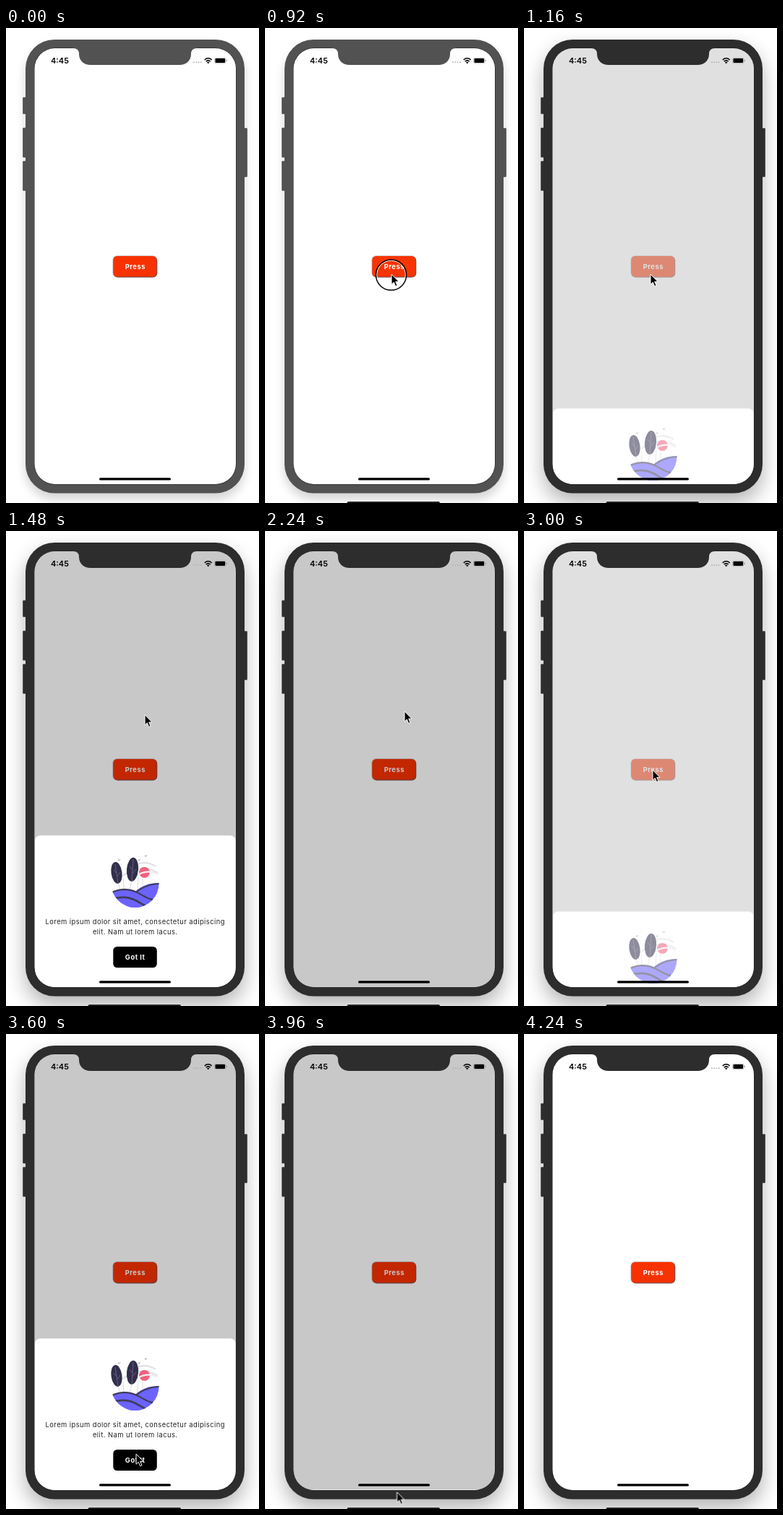
Write an HTML page that moves like this. It is 350 px wide and 656 px high and loops after 4.36 s.

```html
<!DOCTYPE html>
<html lang="en">
<head>
<meta charset="utf-8">
<title>Bottom sheet demo</title>
<style>
  html, body { margin: 0; width: 100%; height: 100%; overflow: hidden; background: #fff; }
  svg { display: block; width: 350px; height: 656px; }
  text { font-family: Inter, "Liberation Sans", sans-serif; }
  .label { font-size: 9.4px; font-weight: 700; letter-spacing: .5px; fill: #fff; text-anchor: middle; }
  .copy { font-size: 9.4px; letter-spacing: .44px; fill: #222; text-anchor: middle; }

  .phone, .soft, .deep, .dock, .backdrop, .sheet, .content, .press, .done, .cursor, .ring {
    animation: 4360ms linear infinite;
  }
  .phone { animation-name: focus; animation-timing-function: step-end; }
  .soft { animation-name: soft; animation-timing-function: step-end; }
  .deep { animation-name: deep; animation-timing-function: step-end; }
  .dock { animation-name: dock; animation-timing-function: step-end; }
  .ring { animation-name: ring; animation-timing-function: step-end; }
  .backdrop { animation-name: backdrop; }
  .content { animation-name: content; }
  .sheet { animation-name: slide; animation-timing-function: ease-in-out; }
  .press { animation-name: press; }
  .done { animation-name: done; }
  .cursor { animation-name: point; animation-timing-function: ease-in-out; }

  @keyframes focus { 0% { color: #525252 } 22%, 100% { color: #2d2d2d } }
  @keyframes soft { 0% { opacity: .17 } 22%, 100% { opacity: 0 } }
  @keyframes deep { 0% { opacity: 0 } 22%, 100% { opacity: .3 } }
  @keyframes dock { 0% { opacity: 0 } 5.5%, 100% { opacity: 1 } }
  @keyframes ring {
    0%, 23.85%, 44.95%, 66.05%, 86.24%, 100% { opacity: 0 }
    21.1%, 42.2%, 63.3%, 83.48% { opacity: 1 }
  }
  @keyframes backdrop {
    0%, 22.94%, 56.88%, 65.14%, 97.2%, 100% { opacity: 0 }
    29.59%, 51.4%, 71.79%, 91.28% { opacity: .216 }
  }
  @keyframes content {
    0%, 22.94%, 50.92%, 65.14%, 91.28%, 100% { opacity: 0 }
    29.59%, 44.95%, 71.79%, 85.78% { opacity: 1 }
  }
  @keyframes slide {
    0%, 23.17%, 50.92%, 65.37%, 91.28%, 100% { transform: translateY(212px) }
    30.05%, 44.95%, 72.25%, 85.78% { transform: none }
  }
  @keyframes press {
    0%, 21.1%, 30.73%, 63.3%, 72.94%, 100% { opacity: 1 }
    22.94%, 24.31%, 65.14%, 66.51% { opacity: .2 }
  }
  @keyframes done {
    0%, 83.49%, 92%, 100% { opacity: 1 }
    85.3%, 86.7% { opacity: .2 }
  }
  @keyframes point {
    0%, 5.4% { transform: translate(182px, 662px) }
    15.6%, 26.6% { transform: translate(175px, 340px) }
    33.03% { transform: translate(192px, 254px) }
    39%, 52.29% { transform: translate(193px, 249px) }
    59.63%, 74.3% { transform: translate(178px, 330px) }
    81.65%, 87.16% { transform: translate(180px, 580px) }
    93.58%, 100% { transform: translate(184px, 664px) }
  }
</style>
</head>
<body>
<svg viewBox="0 0 350 656" width="350" height="656">
  <defs>
    <clipPath id="screen"><rect x="39.5" y="28" width="278.5" height="602" rx="28"/></clipPath>
    <clipPath id="disc"><circle cx="178.5" cy="487" r="33"/></clipPath>
    <filter id="near" x="-20%" y="-20%" width="140%" height="140%"><feGaussianBlur stdDeviation="7"/></filter>
    <filter id="far" x="-20%" y="-20%" width="140%" height="140%"><feGaussianBlur stdDeviation="14"/></filter>
  </defs>

  <rect class="soft" x="27" y="25" width="303" height="626" rx="40" filter="url(#near)"/>
  <rect class="deep" x="27" y="29" width="303" height="626" rx="40" filter="url(#far)"/>

  <g class="phone" fill="currentColor">
    <g stroke="#444" stroke-width=".6">
      <rect x="23.3" y="96" width="6" height="22.5" rx="1"/>
      <rect x="23.3" y="138" width="6" height="40.5" rx="1"/>
      <rect x="23.3" y="184" width="6" height="40.5" rx="1"/>
      <rect x="327" y="138.500" width="6.700" height="67" rx="1"/>
    </g>
    <rect x="27" y="16" width="303" height="626.5" rx="40"/>
    <rect x="39" y="27.500" width="279.500" height="603" rx="28.500" fill="#1c1c1c"/>

    <g clip-path="url(#screen)">
      <rect x="39" y="28" width="280" height="603" fill="#fff"/>
      <g class="press">
        <rect x="147.500" y="314.300" width="61.500" height="30" rx="6" fill="#c9b9bd"/>
        <rect x="148.700" y="315.500" width="60.600" height="29" rx="6" fill="#6e4a55"/>
        <rect x="148.300" y="315" width="60" height="28.600" rx="5.500" fill="#f73200"/>
        <text class="label" x="178.800" y="332.500">Press</text>
      </g>
      <rect class="backdrop" x="39" y="28" width="280" height="603" fill="#000"/>

      <g class="sheet">
        <rect x="40" y="420.500" width="277.500" height="230" rx="7" fill="#fff"/>
        <g class="content">
          <g fill="none" stroke="#e3e3e8" stroke-width="2.500">
            <path d="M162 476Q184 458 210 472M169 467Q188 452 207 463"/>
          </g>
          <circle cx="191.500" cy="471.500" r="7.500" fill="#f0627c"/>
          <path d="M180 477Q193 466 210 474" fill="none" stroke="#eeeef2" stroke-width="2"/>
          <g fill="none" stroke="#c9c9d2" stroke-width=".7">
            <path d="M155 485L158 499M174 483L171 497M162 480L163 495M183 478L182 496M189 480V491"/>
          </g>
          <g fill="#322f4c">
            <ellipse cx="153" cy="472" rx="7.500" ry="15" transform="rotate(-8 153 472)"/>
            <ellipse cx="175" cy="467.500" rx="8" ry="16.500" transform="rotate(5 175 467.500)"/>
          </g>
          <g fill="none" stroke="#77748f" stroke-width=".7">
            <path d="M151 460L155 486M153 473L149 468M154 477L158 471M176 453L174 484M175 468L171 463M175 473L180 467"/>
          </g>
          <path d="M155 454l1.500 1 1.500-1.500M183 454l1 1 1.500-1M192 448.500l1.500 .8 1.500-1.500" fill="none" stroke="#666" stroke-width=".8"/>
          <g clip-path="url(#disc)" fill="#6c63ff">
            <path d="M168 510C180 493 194 485 214 486V522H168Z"/>
            <path d="M174 504C185 493 198 487 214 487" fill="none" stroke="#3f3d56" stroke-width="2"/>
            <path d="M143 501C155 494 169 493 181 499S200 511 214 509V523H143Z"/>
            <path d="M143 501C155 494 169 493 181 499S199 511 212 509" fill="none" stroke="#3f3d56" stroke-width="2.200"/>
            <path d="M143 510C157 504 170 505 181 511S195 520 202 519" fill="none" stroke="#3f3d56" stroke-width="2.600"/>
          </g>
          <text class="copy" x="178.700" y="543">Lorem ipsum dolor sit amet, consectetur adipiscing</text>
          <text class="copy" x="178.700" y="556.500">elit. Nam ut lorem lacus.</text>
          <g class="done">
            <rect x="148.300" y="574" width="60.500" height="29" rx="5.500" fill="#000"/>
            <text class="label" x="178.700" y="592">Got It</text>
          </g>
        </g>
      </g>
    </g>

    <path d="M93 27V28Q101 28 101 36C101 45 108 51 117 51H240C249 51 256 45 256 36Q256 28 264 28V27Z"/>
    <g fill="#000">
      <text x="62" y="49" font-size="11" font-weight="600">4:45</text>
      <g fill="#b5b5b5">
        <circle cx="260" cy="47.300" r="1"/><circle cx="263.300" cy="47.300" r="1"/>
        <circle cx="266.600" cy="47.300" r="1"/><circle cx="269.900" cy="47.300" r="1"/>
      </g>
      <g fill="none" stroke="#000" stroke-width="1.600">
        <path d="M274.700 44Q279.700 39.500 284.700 44M276.700 46.200Q279.700 43.500 282.700 46.200"/>
      </g>
      <path d="M277.900 47.400Q279.700 46 281.500 47.400L279.700 49.300Z"/>
      <rect x="288.600" y="41.200" width="15.400" height="7.600" rx="2" fill="none" stroke="#999" stroke-width=".6"/>
      <rect x="289.500" y="42" width="13.600" height="6" rx="1.200"/>
      <rect x="304.700" y="43.700" width="1" height="2.600" rx=".5" fill="#999"/>
      <rect x="129" y="621.300" width="99" height="3.200" rx="1.600"/>
    </g>
  </g>

  <rect class="dock" x="113.500" y="654" width="128.500" height="6" rx="2" fill="#222"/>

  <g class="cursor">
    <g class="ring" fill="none">
      <circle cx="-.5" cy="1" r="19.800" stroke="#fff" stroke-width="1"/>
      <circle cx="-.5" cy="1" r="21.100" stroke="#000" stroke-width="1.500"/>
    </g>
    <path d="M0 0V14.200L3.300 11.200 5.600 16.600 8 15.600 5.700 10.300H10Z" stroke="#fff" stroke-width="1" stroke-linejoin="round"/>
  </g>
</svg>
</body>
</html>
```
